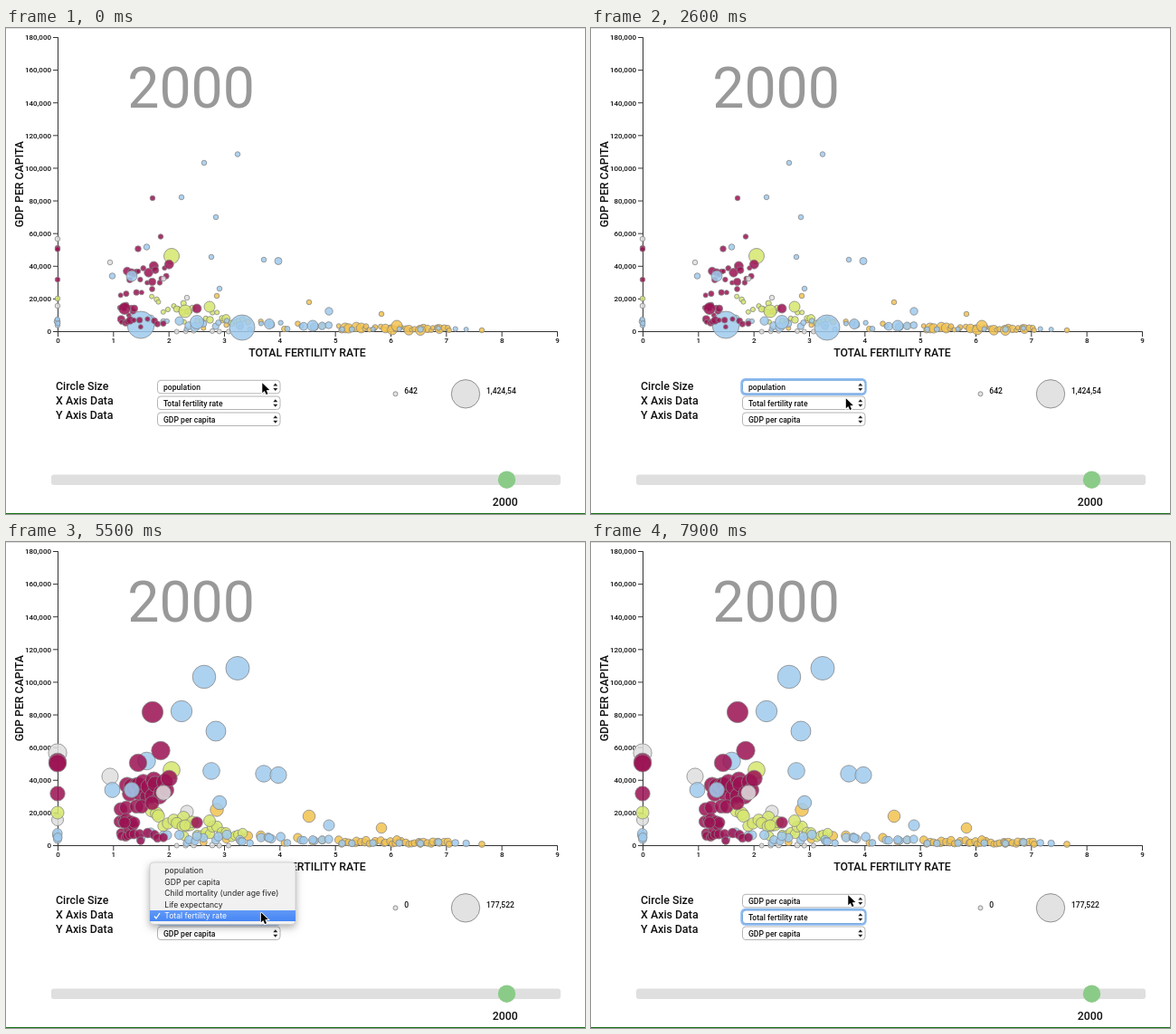
An HTML page with a canvas for the animation above (8 s loop, 640x537 px).

```html
<!DOCTYPE html>
<html lang="en">
<head>
<meta charset="utf-8">
<title>Bubble chart</title>
<style>
html, body { margin: 0; width: 100%; height: 100%; overflow: hidden; background: #fff; }
canvas { display: block; width: 640px; height: 537px; }
</style>
</head>
<body>
<canvas id="stage" width="640" height="537"></canvas>
<script>
const ctx = document.getElementById('stage').getContext('2d');
const LOOP = 8000;
const ROBOTO = 'Roboto, Arial, sans-serif';
const MENU = 'Inter, "Open Sans", sans-serif';
const OPTIONS = ['population', 'GDP per capita', 'Child mortality (under age five)',
  'Life expectancy', 'Total fertility rate'];
const COLORS = { grey: '#dedede', yellow: '#f2c350', green: '#d6e66f', blue: '#9fcbed', red: '#9b1153' };

// Axis scales
const X0 = 57.5, Y0 = 335.5, XSTEP = 552 / 9, YSTEP = 325 / 9;

let seed = 41;
function rand() {
  seed = (seed * 1664525 + 1013904223) % 4294967296;
  return seed / 4294967296;
}

const clamp = (v, a, b) => Math.min(b, Math.max(a, v));
const mix = (a, b, k) => a + (b - a) * k;
const ease = k => k < .5 ? 4 * k * k * k : 1 - Math.pow(2 - 2 * k, 3) / 2;
const ramp = (t, a, b) => ease(clamp((t - a) / (b - a), 0, 1));

const bubbles = [];

// A bubble has one radius by population and one by its height on the GDP axis
function add(color, x, y, pop = 2.8) {
  const gdp = Math.max(0, (Y0 - y) / YSTEP * 20);
  bubbles.push({ color, x, y, pop, gdp: 2.5 + 13.5 * Math.sqrt(gdp / 177.522) });
}

// Bubbles spread evenly in x, at random heights between a sloping top and a floor
function cloud(color, n, xa, xb, topA, topB, floor, maxPop = 3.6) {
  for (let i = 0; i < n; i++) {
    const k = (i + rand()) / n;
    const y = mix(mix(topA, topB, k), floor, rand());
    add(color, mix(xa, xb, k), y, mix(2.5, maxPop, rand() ** 2));
  }
}

const marks = (color, ...points) => points.forEach(p => add(color, ...p));

marks('grey', [57, 233], [57, 307], [115, 259], [200, 298]);
cloud('grey', 6, 186, 250, 334.5, 334.5, 335.5, 2.6);

cloud('yellow', 10, 190, 365, 312, 328, 334);
cloud('yellow', 36, 366, 492, 329, 331, 334, 5.5);
marks('yellow', [233, 296], [335, 303], [415, 316], [432, 329, 6], [458, 334, 5.5], [526, 334]);

cloud('green', 9, 156, 204, 288, 306, 318);
cloud('green', 17, 186, 264, 304, 320, 327, 4.5);
marks('green', [57, 299], [183, 252, 8.5], [198, 313, 7], [225, 308, 6]);

cloud('blue', 4, 56.5, 57.5, 312, 328, 330);
cloud('blue', 24, 158, 360, 320, 326, 333, 5);
cloud('blue', 8, 362, 518, 329, 332, 334);
marks('blue', [256, 139.5], [219, 149], [194, 187], [232, 209], [227, 253], [285, 256],
  [301, 257.5, 4], [155.5, 242, 3.3], [117.5, 274, 3.3], [236, 288], [357, 313, 4.2],
  [211, 325, 7.5], [149, 328, 15], [261, 331, 14], [291, 327, 5.5], [339, 329, 6]);

cloud('red', 18, 132, 181, 268, 259, 284, 5);
cloud('red', 5, 125, 162, 294, 288, 296);
cloud('red', 14, 125, 143, 304, 307, 326, 5);
cloud('red', 6, 143, 175, 318, 316, 332);
marks('red', [162, 188], [171, 230.5], [57, 243], [57, 244.5], [57, 278], [146, 244, 3.3],
  [131, 310, 6.5], [211, 310, 5]);
add('blue', 139, 274, 6);
add('grey', 174, 277);

function text(s, x, y, size, { color = '#111', align = 'left', font = ROBOTO, weight = 500 } = {}) {
  ctx.font = `${weight} ${size}px ${font}`;
  ctx.fillStyle = color;
  ctx.textAlign = align;
  ctx.fillText(s, x, y);
}

function paint(fill, stroke, width) {
  if (fill) { ctx.fillStyle = fill; ctx.fill(); }
  if (stroke) { ctx.strokeStyle = stroke; ctx.lineWidth = width; ctx.stroke(); }
}

function disc(x, y, r, fill, stroke, width = 1) {
  ctx.beginPath();
  ctx.arc(x, y, r, 0, Math.PI * 2);
  paint(fill, stroke, width);
}

function box(x, y, w, h, r, fill, stroke, width = 1) {
  ctx.beginPath();
  ctx.roundRect(x, y, w, h, r);
  paint(fill, stroke, width);
}

function line(points, stroke, width = 1) {
  ctx.beginPath();
  points.forEach(([x, y]) => ctx.lineTo(x, y));
  paint(null, stroke, width);
}

function drawAxes() {
  line([[52, 10.5], [X0, 10.5], [X0, Y0], [52, Y0]], '#333');
  line([[X0, 341], [X0, Y0], [609.5, Y0], [609.5, 341]], '#333');
  for (let i = 0; i <= 9; i++) {
    const x = X0 + i * XSTEP, y = Y0 - i * YSTEP;
    line([[52, y], [X0, y]], '#333');
    line([[x, Y0], [x, 341]], '#333');
    text(i ? i * 20 + ',000' : '0', 50, y + 2.8, 8, { align: 'right' });
    text(i, x, 348, 8, { align: 'center' });
  }
  text('TOTAL FERTILITY RATE', 333, 362.5, 12.3, { align: 'center' });
  ctx.save();
  ctx.translate(18.7, 172.7);
  ctx.rotate(-Math.PI / 2);
  text('GDP PER CAPITA', 0, 0, 12.3, { align: 'center' });
  ctx.restore();
}

function drawBubbles(k) {
  ctx.globalAlpha = .86;
  for (const b of bubbles) disc(b.x, b.y, mix(b.pop, b.gdp, k), COLORS[b.color], '#858585', .9);
  ctx.globalAlpha = 1;
}

function drawSelect(y, label, focus) {
  if (focus) box(166.5, y - 8.5, 137, 16.5, 4, null, '#8ab9ef', 2.4);
  box(167.5, y - 7.5, 135.5, 14.5, 3.5, '#fff', focus ? '#79a9df' : '#b4b4b4');
  text(label, 174, y + 3, 8.6);
  for (const d of [-1, 1]) {
    line([[295.3, y + d * 1.2], [300.3, y + d * 1.2], [297.8, y + d * 4.2]]);
    paint('#222');
  }
}

function drawMenu(top, checked, pointerY) {
  ctx.save();
  ctx.shadowColor = 'rgba(0,0,0,.35)';
  ctx.shadowBlur = 8;
  ctx.shadowOffsetY = 3;
  box(159, top, 161, 68.5, 4, '#f1f1f1');
  ctx.restore();
  box(159, top, 161, 68.5, 4, null, '#c8c8c8', .7);
  const hover = clamp(Math.floor((pointerY - top - 3) / 12.4), 0, 4);
  OPTIONS.forEach((label, i) => {
    const y = top + 9.4 + i * 12.4, on = i === hover, color = on ? '#fff' : '#222';
    if (on) {
      const shade = ctx.createLinearGradient(0, y - 6, 0, y + 6);
      shade.addColorStop(0, '#6299f7');
      shade.addColorStop(1, '#4585f4');
      ctx.fillStyle = shade;
      ctx.fillRect(159, y - 6, 161, 12);
    }
    text(label, 175.3, y + 2.9, 8.6, { color, font: MENU, weight: 400 });
    if (i === checked) line([[164, y + .5], [166, y + 3], [170, y - 3]], color, 1.3);
  });
}

function drawPointer(x, y) {
  const arrow = [[0, 0], [0, 11], [2.5, 8.7], [4.3, 12.7], [6.2, 11.9], [4.5, 8], [8, 7.8], [0, 0]];
  line(arrow.map(([a, b]) => [x + a, y + b]), '#fff', 1.8);
  paint('#000');
}

function pointerAt(t) {
  const a = ramp(t, 600, 1000), b = ramp(t, 1700, 2100), c = ramp(t, 5700, 6200);
  return [
    mix(mix(283.3, 281.8, a), 284.3, c),
    mix(mix(mix(392.3, 406.3, a), 409.3, b), 390.3, c)
  ];
}

function draw(t) {
  const [px, py] = pointerAt(t);
  const sized = t >= 4100;
  const during = (a, b) => t >= a && t < b;

  ctx.fillStyle = '#fff';
  ctx.fillRect(0, 0, 640, 537);
  ctx.fillStyle = '#dcdcdc';
  ctx.fillRect(0, 0, 640, 1);
  ctx.fillStyle = '#167316';
  ctx.fillRect(0, 536, 640, 1);

  text('2000', 134.2, 88, 62.6, { color: '#999', weight: 400 });
  drawAxes();
  drawBubbles(ramp(t, 4100, 4500));

  ['Circle Size', 'X Axis Data', 'Y Axis Data'].forEach((s, i) => text(s, 55, 399.6 + i * 16.3, 12.4));
  drawSelect(396.8, OPTIONS[sized ? 1 : 0], during(500, 5000));
  drawSelect(414.5, OPTIONS[4], t >= 5000);
  drawSelect(432.5, OPTIONS[1], false);

  disc(430.5, 404.3, 2.5, '#e2e2e2', '#888', .9);
  disc(508, 404.3, 15.7, '#e2e2e2', '#888', .9);
  text(sized ? '0' : '642', 440.3, 404.3, 8.6);
  text(sized ? '177,522' : '1,424,54', 531, 404.3, 8.5);

  box(50, 493.5, 563, 11.5, 3, '#dfdfdf');
  disc(553.5, 499.2, 9.7, '#8bcb88');
  text('2000', 551.7, 527.5, 12.3, { align: 'center' });

  if (during(500, 2000)) drawMenu(386, 0, py);
  if (during(5000, 6600)) drawMenu(354, 4, py);

  if (during(300, 550) || during(1750, 2000) || during(4850, 5100) || during(6200, 6500)) {
    disc(px, py + .7, 16.5, null, '#222', 1.5);
  }
  drawPointer(px, py);
}

const start = performance.now();
function tick() {
  draw((performance.now() - start) % LOOP);
  requestAnimationFrame(tick);
}
tick();
</script>
</body>
</html>
```
